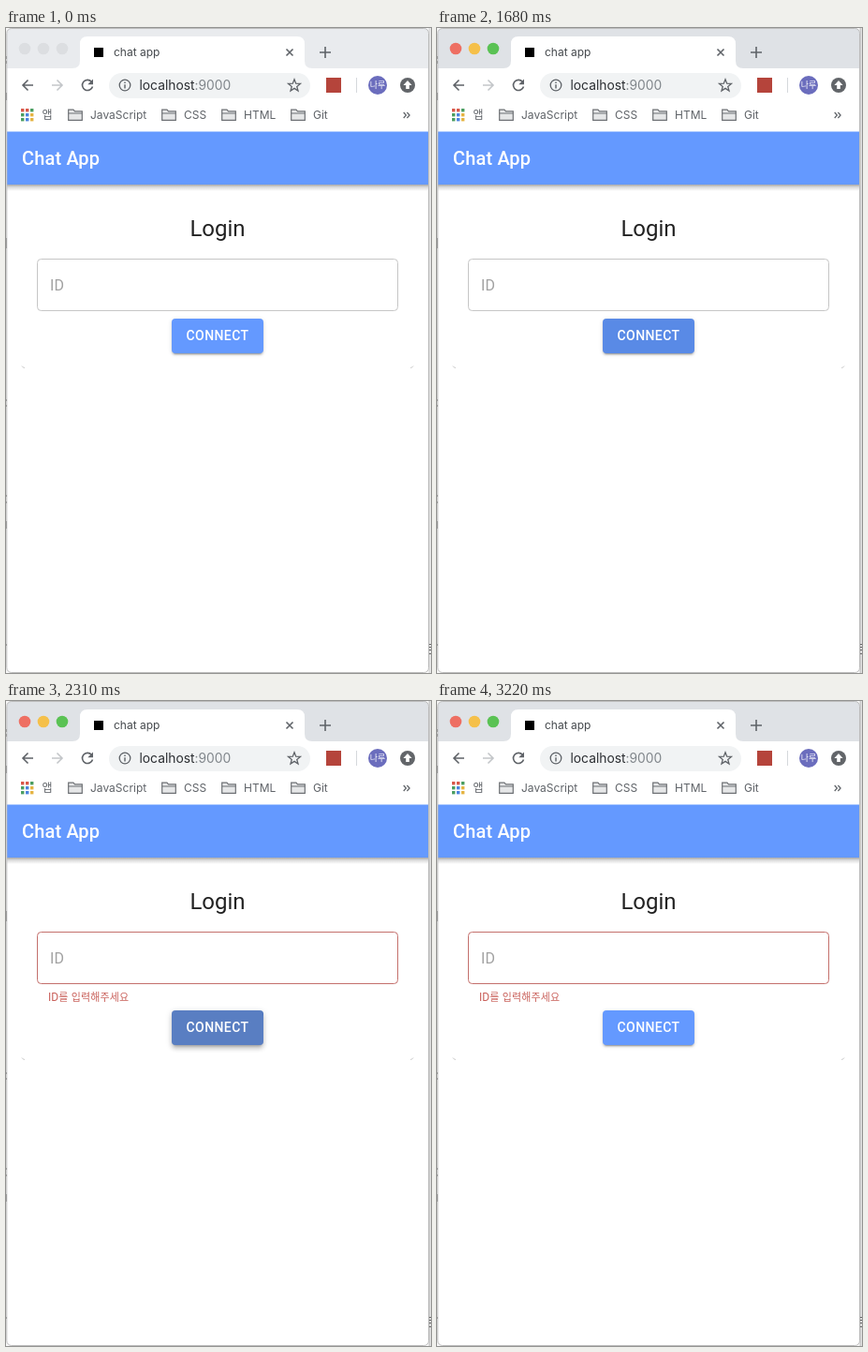
Animation of 454 by 688 pixels, one loop 3290 ms. Source, as an HTML page:

```html
<!DOCTYPE html>
<html lang="ko">
<head>
<meta charset="utf-8">
<title>chat app</title>
<style>
html, body { margin: 0; width: 100%; height: 100%; overflow: hidden; background: #f7f7f7; }
svg { position: absolute; left: 0; top: 0; display: block; }
.ui { font-family: Inter, "Noto Sans CJK KR", "Noto Sans CJK", sans-serif; font-size: 12px; fill: #5f6368; }
.app { font-family: Roboto, sans-serif; fill: #212121; }
.ko { font-family: "Noto Sans CJK KR", "Noto Sans CJK", sans-serif; }
.line { fill: none; stroke: #5f6368; stroke-width: 1.6; }
#button {
  position: absolute; left: 177px; top: 310px; width: 98px; height: 36.5px;
  border-radius: 4px; overflow: hidden; color: #fff; text-align: center;
  font: 500 14px/36.5px Roboto, sans-serif; letter-spacing: .4px;
}
#button span { position: relative; }
#ripple { position: absolute; border-radius: 50%; background: #fff; }
</style>
</head>
<body>
<svg width="454" height="688" viewBox="0 0 454 688">
  <defs>
    <linearGradient id="drop" x2="0" y2="1">
      <stop offset="0" stop-color="#000" stop-opacity=".34"/>
      <stop offset=".4" stop-color="#000" stop-opacity=".14"/>
      <stop offset="1" stop-color="#000" stop-opacity="0"/>
    </linearGradient>
    <g id="folder">
      <path d="M.7 12.3V1.2H6l1.5 1.7h7.8v9.4z" fill="#e6e7e8" stroke="#6d7074" stroke-width="1.2"/>
      <path d="M.7 5h14.6" stroke="#6d7074"/>
    </g>
    <clipPath id="frame"><rect x="1" width="450.5" height="687.5" rx="5"/></clipPath>
  </defs>

  <!-- what shows around the window -->
  <path id="edge" d="M452.5 0V688" stroke="#d4d4d4" stroke-width="2"/>
  <path d="M0 30v3m0 2v3M0 69v8M0 224v11M0 396v2m0 4v2M0 498v2m0 5v2M0 526v8M0 657v2" stroke="#555" stroke-width="2"/>
  <path d="M450 657.5h4M454 660.5h-3v3h3m0 4h-3" fill="none" stroke="#666"/>

  <g clip-path="url(#frame)">
    <rect width="454" height="688" fill="#fff"/>
    <rect id="strip" width="454" height="43"/>
    <g id="lights">
      <circle cx="20" cy="22" r="6.3"/><circle cx="40" cy="22" r="6.3"/><circle cx="60" cy="22" r="6.3"/>
    </g>
    <path d="M71 43q8 0 8-8V17q0-8 8-8H311q8 0 8 8V35q0 8 8 8z" fill="#fff"/>
    <rect x="94" y="21" width="10" height="10"/>
    <text class="ui" x="115" y="30" style="fill:#45494d">chat app</text>
    <path class="line" d="M299.5 22.5l7 7m0-7l-7 7M335 26h12M341 20v12"/>

    <path class="line" d="M29 61H18m5.5-5.5L18 61l5.5 5.5"/>
    <path class="line" d="M49 61h11m-5.5-5.5L60 61l-5.5 5.5" style="stroke:#c3c6c9"/>
    <path class="line" d="M91.3 57.2A5.6 5.6 0 1 0 92.5 62.5"/>
    <path d="M93 54.5v5.7h-5.7z" fill="#5f6368"/>
    <rect x="110" y="48" width="215" height="27" rx="13.5" fill="#f1f3f4"/>
    <circle class="line" cx="127" cy="61" r="5.8" style="stroke-width:1.3"/>
    <path class="line" d="M127 57.5v1.5m0 1.3v4.2" style="stroke-width:1.4"/>
    <text class="ui" x="142.5" y="66" style="font-size:13.8px;fill:#2b2e32">localhost<tspan fill="#80868b">:9000</tspan></text>
    <path id="star" class="line" style="stroke-width:1.3"/>
    <rect x="342" y="53" width="16" height="16" fill="#b5443b"/>
    <path d="M374.5 53v16" stroke="#d5d8dc"/>
    <circle cx="397" cy="61" r="10" fill="#6b6dbd"/>
    <text class="ko" x="397" y="64.3" font-size="9" fill="#fff" text-anchor="middle">나루</text>
    <circle cx="429" cy="61" r="8" fill="#626569"/>
    <path d="M429 56l4.6 5h-2.8v4h-3.6v-4h-2.8z" fill="#fff"/>

    <g id="grid"></g>
    <text class="ui ko" x="38.5" y="97">앱</text>
    <use href="#folder" x="66" y="86"/><text class="ui" x="90" y="97">JavaScript</text>
    <use href="#folder" x="166" y="86"/><text class="ui" x="190" y="97">CSS</text>
    <use href="#folder" x="230" y="86"/><text class="ui" x="254" y="97">HTML</text>
    <use href="#folder" x="304" y="86"/><text class="ui" x="328" y="97">Git</text>
    <path class="line" d="M424.7 90l2.7 3-2.7 3m3.7-6l2.7 3-2.7 3" style="stroke-width:1.2"/>

    <rect y="167" width="454" height="7" fill="url(#drop)"/>
    <rect y="110.5" width="454" height="56.5" fill="#6499ff"/>
    <text class="app" x="17" y="146" font-size="20" font-weight="500" letter-spacing=".15" style="fill:#fff">Chat App</text>

    <text class="app" x="226" y="222" font-size="24" text-anchor="middle">Login</text>
    <rect id="field" x="33.5" y="246.5" width="385" height="55" rx="4" fill="none"/>
    <text class="app" x="47" y="280" font-size="16" letter-spacing=".15" style="fill:#a2a2a2">ID</text>
    <text id="error" class="app" x="45" y="319.5" font-size="12" style="fill:#c9605a">ID<tspan class="ko" font-size="11" letter-spacing=".15">를 입력해주세요</tspan></text>
    <path id="corners" d="M17 360.5q.8 1.8 3 2M435 360.5q-.8 1.8-3 2" fill="none" stroke="#ccc"/>
  </g>
  <rect x=".8" y=".5" width="450.7" height="687" rx="5" fill="none" stroke="#bdbdbd"/>
</svg>
<div id="button"><div id="ripple"></div><span>CONNECT</span></div>

<script>
const LOOP = 3290, STEP = 70;
const ACTIVATE = 980, HOVER = 1605, PRESS = 1895, RELEASE = 2200, LEAVE = 2880;
const BLUE = [100, 153, 255], DARK = [71, 112, 187];
// box shadows as [y, blur, spread, alpha]
const REST = [[3, 1, -2, .2], [2, 2, 0, .14], [1, 5, 0, .12]];
const RAISED = [[5, 5, -3, .2], [8, 10, 1, .14], [3, 14, 2, .12]];
const CLICK = { x: 18.6, y: 32, r: 87 };

const $ = id => document.getElementById(id);
const mix = (a, b, k) => a + (b - a) * k;
const clamp = v => Math.min(1, Math.max(0, v));

// cubic-bezier(.4, 0, .2, 1), solved by bisection
function ease(x) {
  if (x <= 0 || x >= 1) return clamp(x);
  let lo = 0, hi = 1, s;
  for (let i = 0; i < 20; i++) {
    s = (lo + hi) / 2;
    const at = 1.2 * s * (1 - s) ** 2 + .6 * s * s * (1 - s) + s ** 3;
    if (at < x) lo = s; else hi = s;
  }
  return s * s * (3 - 2 * s);
}
const ramp = (t, start, length) => ease((t - start) / length);

function drawStatic() {
  const points = Array.from({ length: 10 }, (_, i) => {
    const a = i * Math.PI / 5 - Math.PI / 2, r = i % 2 ? 2.9 : 6.8;
    return (308 + r * Math.cos(a)).toFixed(2) + ' ' + (61.5 + r * Math.sin(a)).toFixed(2);
  });
  $('star').setAttribute('d', 'M' + points.join('L') + 'z');

  const red = '#d9584a', green = '#4b9e61', blue = '#4c84e0', yellow = '#e5b443';
  $('grid').innerHTML = [red, red, green, green, blue, yellow, green, blue, yellow].map((c, i) =>
    `<rect x="${16 + i % 3 * 5}" y="${86 + Math.floor(i / 3) * 5}" width="3.4" height="3.4" fill="${c}"/>`).join('');
}

function render(t) {
  const active = t >= ACTIVATE, failed = t >= RELEASE;
  const shift = failed ? 20 : 0;

  $('strip').setAttribute('fill', active ? '#dfe2e6' : '#e9ebee');
  $('edge').setAttribute('stroke', active ? '#cbcbcb' : '#dcdcdc');
  const colors = active ? ['#ee6f63', '#f5c04a', '#5ac254'] : Array(3).fill('#dcdee1');
  [...$('lights').children].forEach((c, i) => c.setAttribute('fill', colors[i]));

  $('field').setAttribute('stroke', failed ? '#c4706c' : '#c6c6c6');
  $('error').setAttribute('visibility', failed ? 'visible' : 'hidden');
  $('corners').setAttribute('transform', `translate(0 ${shift})`);

  const hover = ramp(t, HOVER, 250) - ramp(t, LEAVE, 250);
  const lift = ramp(t, PRESS, 250) - ramp(t, RELEASE, 250);
  const button = $('button').style;
  button.transform = `translateY(${shift}px)`;
  button.backgroundColor = `rgb(${BLUE.map((v, i) => Math.round(mix(v, DARK[i], hover)))})`;
  button.boxShadow = REST.map((s, i) => {
    const [y, blur, spread, alpha] = s.map((v, j) => mix(v, RAISED[i][j], lift));
    return `0 ${y}px ${blur}px ${spread}px rgba(0,0,0,${alpha})`;
  }).join();

  const grow = ramp(t, PRESS, 550), r = CLICK.r * grow;
  const ripple = $('ripple').style;
  ripple.left = CLICK.x - r + 'px';
  ripple.top = CLICK.y - r + 'px';
  ripple.width = ripple.height = 2 * r + 'px';
  ripple.opacity = t < PRESS ? 0 : mix(.1, .3, grow) * (1 - ramp(t, RELEASE, 260));
}

drawStatic();
const start = performance.now();
function tick() {
  const t = (performance.now() - start) % LOOP;
  render(Math.floor(t / STEP) * STEP);
  requestAnimationFrame(tick);
}
tick();
</script>
</body>
</html>
```
